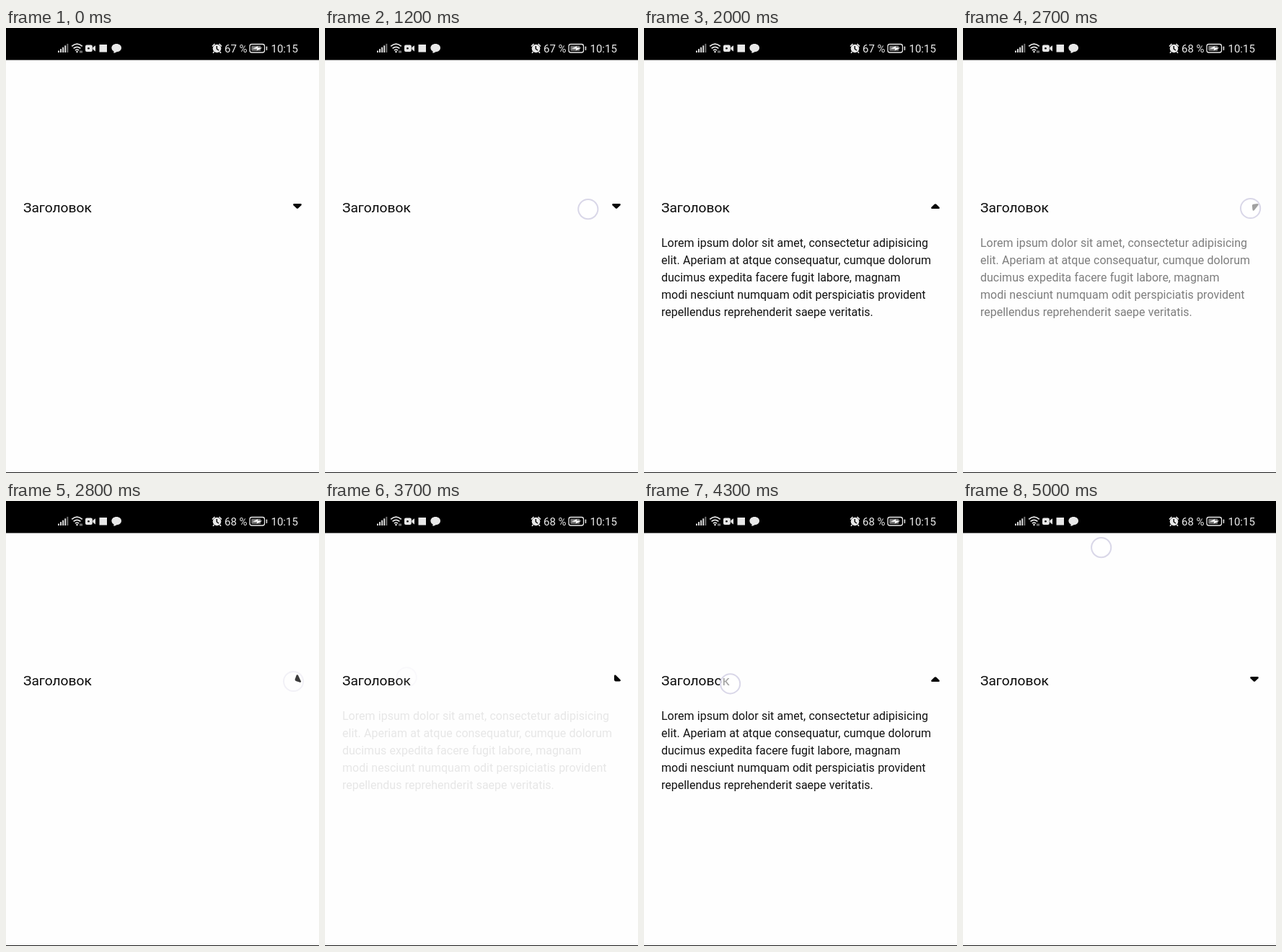
Animation of 434x618 px, one loop 5.3 s. Source, as an HTML page:

```html
<!DOCTYPE html>
<html lang="ru">
<head>
<meta charset="utf-8">
<title>Accordion</title>
<style>
  html, body { margin: 0; width: 100%; height: 100%; overflow: hidden; background: #fefefe; }
  svg { display: block; width: 100vw; height: 100vh; }
  text { font-family: Roboto, "Noto Sans", sans-serif; }
  .status { font-size: 15px; fill: #ececec; }
  .title { font-size: 19.2px; fill: #0c0c0c; }
  .body { font-size: 16px; fill: #111; word-spacing: .3px; }
</style>
</head>
<body>
<svg viewBox="0 0 434 618">
  <rect width="434" height="618" fill="#fefefe"/>
  <rect width="434" height="44.5"/>
  <rect y="617" width="434" height="1" fill="#1a1a1a"/>

  <g fill="#e8e8e8">
    <g id="signal"></g>
    <g fill="none" stroke="#e8e8e8" stroke-width="1.7">
      <path d="M91.2 25.4Q98.5 18.8 105.8 25.4M93.6 28.4Q98.5 24.2 103.4 28.4"/>
      <path d="M95.9 31.1Q98.5 29 101.1 31.1" stroke-width="1.5"/>
    </g>
    <circle cx="98.5" cy="33" r="1.3"/>
    <path d="M102.3 31.5h1.3v3h-1.3zM104.4 31.5h1.3v3h-1.3z" opacity=".75"/>

    <rect x="110" y="23.5" width="9.8" height="9.5" rx="2"/>
    <path d="M120.3 27L124 24.2V32.4L120.3 29.6Z"/>
    <circle cx="114.5" cy="28.3" r="1.3" fill="#000"/>
    <rect x="129.5" y="23" width="10.5" height="10.5"/>
    <path d="M153.2 22c4 0 6.8 2.4 6.8 5.6s-2.8 5.7-6.6 5.7c-1.4 1-2.8 1.5-4.2 1.3l.4-2c-2-1-3.2-2.8-3.2-5 0-3.200 2.800-5.600 6.800-5.600z"/>

    <circle cx="292.500" cy="28.500" r="5.800"/>
    <path d="M286 25.500L289.500 22M295.500 22L299 25.500M288.500 33L287 34.700M296.500 33L298 34.700" stroke="#e8e8e8" stroke-width="1.700"/>
    <path d="M292.300 25V29L295 31" fill="none" stroke="#000" stroke-width="1.400"/>

    <rect x="338" y="22.500" width="20.500" height="11.500" rx="2.800" fill="none" stroke="#e8e8e8" stroke-width="1.300"/>
    <rect x="340.300" y="24.700" width="13" height="7.100" rx="1" fill="#777"/>
    <path d="M342 28.800L349.500 25L348.800 27.500H355.500L347.500 31.600L348.400 28.800Z" fill="#fff"/>
    <rect x="360.700" y="25.500" width="1.500" height="5.500" rx=".7"/>
  </g>
  <text id="charge" class="status" x="303" y="34"></text>
  <text class="status" x="367.500" y="34">10:15</text>

  <text class="title" x="24" y="256">Заголовок</text>
  <path id="caret" d="M-4.600 -3.300H4.600Q6.600 -2.800 5.400 -1.100L1.300 3Q0 4.100 -1.300 3L-5.400 -1.100Q-6.600 -2.800 -4.600 -3.300Z" fill="#080808"/>
  <g id="panel" class="body"></g>

  <circle id="touch" r="13.600" fill="#fff" fill-opacity=".62" stroke="#d9d7e8" stroke-width="2"/>
</svg>
<script>
const LOOP = 5300, STEP = 100;
const el = id => document.getElementById(id);
const clamp = v => Math.max(0, Math.min(1, v));

const lines = [
  "Lorem ipsum dolor sit amet, consectetur adipisicing",
  "elit. Aperiam at atque consequatur, cumque dolorum",
  "ducimus expedita facere fugit labore, magnam",
  "modi nesciunt numquam odit perspiciatis provident",
  "repellendus reprehenderit saepe veritatis."
];
el("panel").innerHTML = lines
  .map((line, i) => `<text x="24" y="${303.5 + 24 * i}">${line}</text>`).join("");

el("signal").innerHTML = [0, 1, 2, 3, 4].map(i => {
  const h = 2.5 + 2.4 * i;
  return `<rect x="${72 + 3.1 * i}" y="${34 - h}" width="1.9" height="${h}" opacity="${i < 4 ? 1 : .5}"/>`;
}).join("");

const moves = [
  { start: 1680, length: 300, opens: true },
  { start: 2620, length: 280, opens: false },
  { start: 3620, length: 320, opens: true },
  { start: 4300, length: 200, opens: false }
];

const touches = [
  { from: 1200, fade: 1650, to: 1750, x: 364.8, y: 251.6 },
  { from: 2600, fade: 2700, to: 2850, x: 398.6, y: 250.5 },
  { from: 3200, fade: 3560, to: 3720, x: 113.2, y: 244.8 },
  { from: 4200, fade: 4350, to: 4450, x: 119.6, y: 253.8 },
  { from: 5000, fade: 5300, to: 5400, x: 191.7, y: 64.6 }
];

function panelState(t) {
  const move = moves.filter(m => t >= m.start).pop();
  if (!move) return { turn: 0, opacity: 0 };
  const p = clamp((t - move.start) / move.length);
  return move.opens
    ? { turn: p, opacity: p ** 1.7 }
    : { turn: 1 - p, opacity: clamp(1 - 1.6 * p) };
}

function render(t) {
  const { turn, opacity } = panelState(t);
  el("panel").setAttribute("opacity", opacity);
  el("caret").setAttribute("transform", `translate(404 ${247.3 + .4 * turn}) rotate(${180 * turn})`);
  el("charge").textContent = t < 2600 ? "67 %" : "68 %";

  const touch = touches.find(c => t >= c.from && t < c.to);
  const ring = el("touch");
  ring.setAttribute("opacity", touch ? clamp((touch.to - t) / (touch.to - touch.fade)) : 0);
  if (touch) {
    ring.setAttribute("cx", touch.x);
    ring.setAttribute("cy", touch.y);
  }
}

const origin = performance.now();
function tick() {
  const t = (performance.now() - origin) % LOOP;
  render(Math.floor(t / STEP) * STEP);
  requestAnimationFrame(tick);
}
tick();
</script>
</body>
</html>
```
